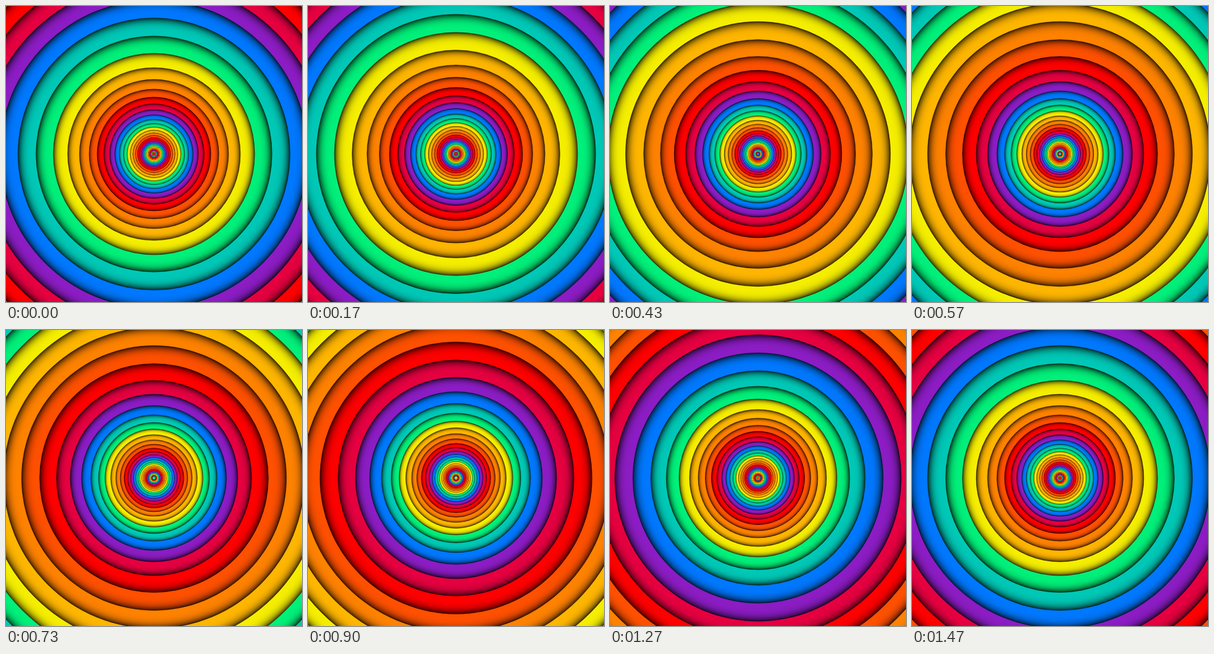
An HTML page with a canvas for the animation above (1.51 s loop, 480 by 480 pixels).

```html
<!DOCTYPE html>
<html lang="en">
<head>
<meta charset="utf-8">
<title>Rainbow tunnel</title>
<style>
  html, body { margin: 0; width: 100%; height: 100%; overflow: hidden; background: #000; }
  canvas { display: block; width: 480px; height: 480px; }
</style>
</head>
<body>
<canvas id="stage" width="480" height="480"></canvas>
<script>
const ctx = document.getElementById('stage').getContext('2d');
const LOOP = 1510, CENTER = 240, STEPS_PER_RING = 5;

// From one ring to the next one outside it.
const COLORS = ['#00c8b6', '#0078ff', '#8c1cc4', '#e60040', '#ff0000',
                '#ff5000', '#ff8200', '#ffb600', '#f5ee00', '#00f07a'];

// Edge radius: geometric near the centre, then swelling faster, then evenly spaced.
const FAR = -6.5, NEAR = -1.2;
const outside = depth => 220.6 + 29.3 * depth;
const between = depth => 32 + (outside(NEAR) - 32) * Math.exp(0.195 * (depth - NEAR));
const inside = depth => between(FAR) * Math.exp(0.123 * (depth - FAR));

function radius(depth) {
  return depth > NEAR ? outside(depth) : depth > FAR ? between(depth) : inside(depth);
}

function drawRing(inner, outer, color) {
  const shade = ctx.createRadialGradient(CENTER, CENTER, inner, CENTER, CENTER, outer);
  for (let t = 0; t <= 1; t += 0.125) {
    shade.addColorStop(t, `rgba(0, 0, 0, ${0.78 * t ** 4})`);
  }
  ctx.beginPath();
  ctx.arc(CENTER, CENTER, outer, 0, Math.PI * 2);
  ctx.fillStyle = color;
  ctx.fill();
  ctx.fillStyle = shade;
  ctx.fill();
  ctx.lineWidth = Math.min(1, (outer - inner) * 0.1);
  ctx.strokeStyle = 'rgba(0, 0, 0, 0.45)';
  ctx.stroke();
}

// 45 pictures, held 30 or 40 ms, sampled from 50 even steps.
function stepAt(ms) {
  const picture = Math.min(44, Math.floor((Math.floor(ms / 10) * 3 + 1) / 10));
  return Math.round(picture * 10 / 9);
}

function draw(ms) {
  const step = stepAt(ms);
  const shift = Math.floor(step / STEPS_PER_RING);
  const part = step % STEPS_PER_RING / STEPS_PER_RING;
  for (let slot = 5; slot > -38; slot--) {
    const depth = slot + part;
    const color = COLORS[(slot - shift + 60) % COLORS.length];
    drawRing(radius(depth - 1), radius(depth), color);
  }
}

function tick() {
  draw(performance.now() % LOOP);
  requestAnimationFrame(tick);
}
tick();
</script>
</body>
</html>
```
